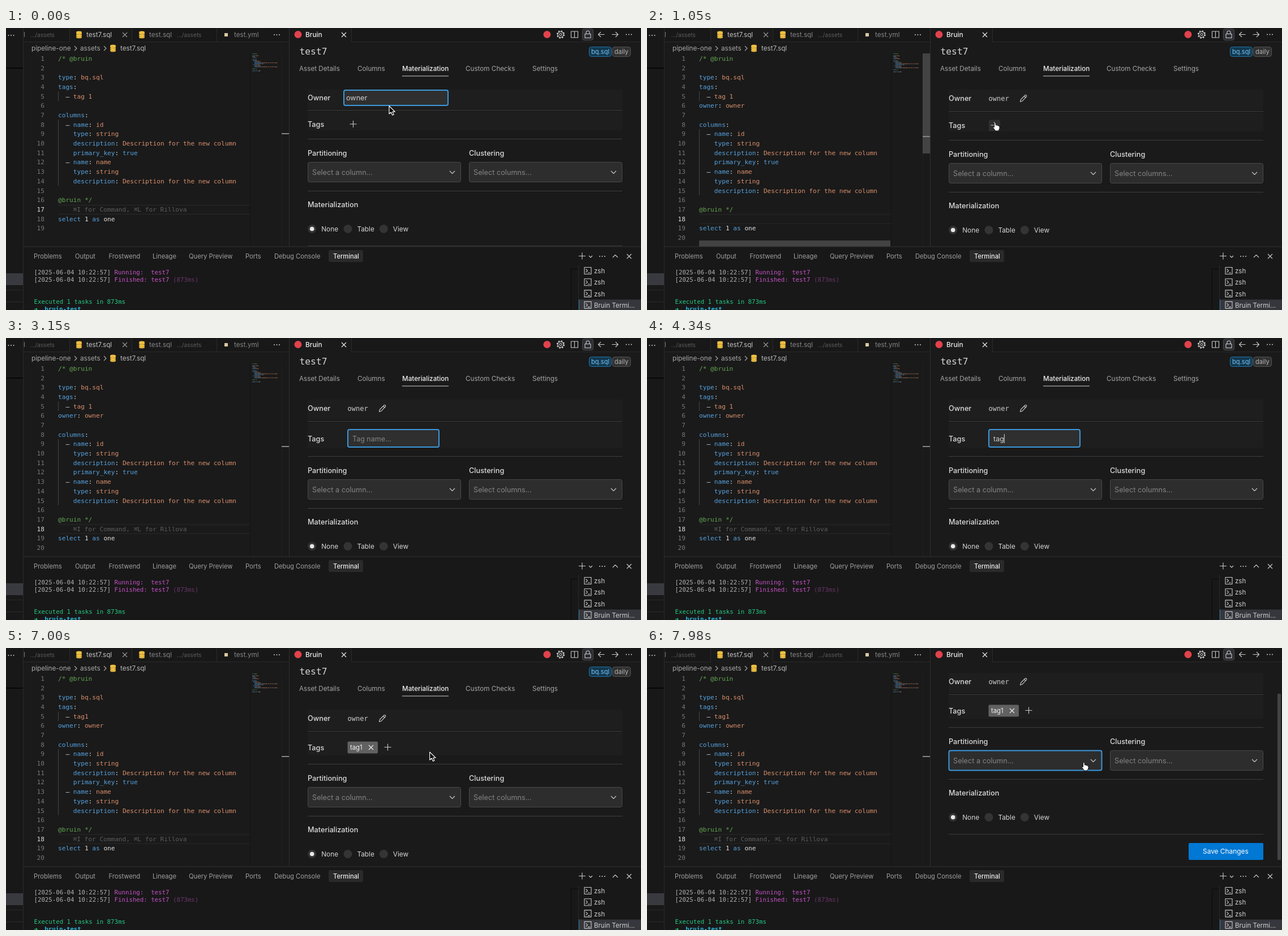
Write an HTML page with a canvas that moves like this. It is 1122 px wide and 499 px high and loops after 8000 ms.

```html
<!DOCTYPE html>
<html>
<head>
<meta charset="utf-8">
<style>
  html, body { margin: 0; width: 100%; height: 100%; overflow: hidden; background: #181818; }
  canvas { display: block; }
</style>
</head>
<body>
<canvas id="stage" width="1122" height="499"></canvas>
<script>
const ctx = document.getElementById('stage').getContext('2d');
const SANS = 'Inter, "Open Sans", sans-serif';
const MONO = '"DejaVu Sans Mono", "DejaVu Sans", monospace';
const EDITOR = '#1a1a1a', BAR = '#181818', BORDER = '#2a2a2a', RULE = '#3e3e3e';
const KEY = '#56a3e0', STRING = '#d98f6c', COMMENT = '#62a552', WHITE = '#e2e2e2';
const LIGHT = '#cacaca', DIM = '#848484', FOCUS = '#3b98dc', YELLOW = '#f0c040', RED = '#e2424c';
const LOOP = 8000, STEP = 70, LINE = 16.68, CHAR = 6.7;

// --- drawing helpers; text is placed by the vertical centre of its capitals
function text(s, x, y, color = LIGHT, size = 11.7, weight = 400, font = SANS) {
  ctx.font = `${weight} ${size}px ${font}`;
  ctx.fillStyle = color;
  ctx.fillText(s, x, y + size * 0.36);
}
const mono = (s, x, y, color, size = 11.13, weight = 400) => text(s, x, y, color, size, weight, MONO);

function rect(x, y, w, h, color) {
  ctx.fillStyle = color;
  ctx.fillRect(x, y, w, h);
}
function box(x, y, w, h, fill, stroke, radius = 3, line = 1) {
  ctx.beginPath();
  ctx.roundRect(x, y, w, h, radius);
  ctx.fillStyle = fill;
  ctx.fill();
  if (!stroke) return;
  ctx.strokeStyle = stroke;
  ctx.lineWidth = line;
  ctx.stroke();
}
function disc(x, y, r, color) {
  ctx.beginPath();
  ctx.arc(x, y, r, 0, 7);
  ctx.fillStyle = color;
  ctx.fill();
}
function icon(d, x, y, stroke = LIGHT, line = 1.1, fill) {
  const path = new Path2D(d);
  ctx.save();
  ctx.translate(x, y);
  ctx.lineWidth = line;
  ctx.lineJoin = 'round';
  ctx.strokeStyle = stroke;
  if (fill) { ctx.fillStyle = fill; ctx.fill(path); }
  ctx.stroke(path);
  ctx.restore();
}
const CROSS = 'M-4-4L4 4M4-4L-4 4', PLUS = 'M-6 0H6M0-6V6', DOWN = 'M-4.5-2L0 2.5L4.5-2', CRUMB = 'M-2-4L2 0L-2 4';
const PENCIL = 'M-5.5 6L-4.5 2L3-5.5Q4.5-6.5 5.5-5.3Q6.3-4.2 5.3-3L-2 4.8ZM1.5-4L4-1.5';
const ARROW = 'M0 0V14L3.3 11L5.8 16.2L8.2 15.2L5.9 10.2H10.3Z';
const HAND = 'M2.5 1.5Q4-.6 5.2 1.5V5Q7 4.2 7.8 5.5Q9.4 4.9 10 6.2Q12 6 12 8V10.5Q11 13 10 15H4.5Q3 12 .5 9.5Q0 7.4 2.5 8.5Z';
const dots = (x, y) => [-4.5, 0, 4.5].forEach(dx => disc(x + dx, y, 1, LIGHT));

function database(x, y) {
  ctx.fillStyle = YELLOW;
  for (const dy of [4.2, 1, -2.2, -4.6]) {
    ctx.beginPath();
    ctx.ellipse(x, y + dy, 5, 2, 0, 0, dy < -4 ? 7 : Math.PI);
    ctx.fill();
    if (dy > -4) ctx.fillRect(x - 5, y + dy - 1.3, 10, 1.4);
  }
}

// --- timing helpers
function smooth(t, from, to) {
  const p = Math.min(1, Math.max(0, (t - from) / (to - from)));
  return p * p * (3 - 2 * p);
}
function along(keys, t) {
  let [, x, y] = keys[0];
  for (let i = 1; i < keys.length; i++) {
    const p = smooth(t, keys[i - 1][0], keys[i][0]);
    x += (keys[i][1] - keys[i - 1][1]) * p;
    y += (keys[i][2] - keys[i - 1][2]) * p;
  }
  return [x, y];
}

// --- editor
function codeLines(t) {
  const column = (name, extra = []) => [`  – name: ${name}`, '    type: string',
    '    description: Description for the new column', ...extra];
  return ['/* @bruin', '', 'type: bq.sql', 'tags:', t < 6510 ? '  – tag 1' : '  – tag1',
    ...(t < 490 ? [] : ['owner: owner']), '', 'columns:',
    ...column('id', ['    primary_key: true']), ...column('name'),
    '', '@bruin */', '', 'select 1 as one', ''];
}
function tokens(line) {
  if (line.includes('@bruin')) return [[line, COMMENT]];
  if (line.startsWith('select'))
    return line.split(/(?= )/).map(w => [w, /select|as/.test(w) ? KEY : WHITE]);
  const [, lead, key = '', colon = '', value] = line.match(/^(\s*(?:– )?)(?:(\w+)(:))?(.*)$/);
  return [[lead, WHITE], [key, KEY], [colon, WHITE], [value, value === ' true' ? KEY : STRING]];
}
function scrollbarOpacity(t) {
  if (t < 490 || t >= 2400) return 0;
  return Math.max(0, 1 - 0.68 * smooth(t, 980, 1400) - 0.32 * smooth(t, 2100, 2400));
}
function drawEditor(t) {
  const lines = codeLines(t), current = lines.length - 2;
  rect(31, 25, 469, 362, EDITOR);
  text('pipeline-one', 45, 36, '#a8a8a8');
  icon(CRUMB, 123, 36, '#a8a8a8');
  text('assets', 131, 36, '#a8a8a8');
  icon(CRUMB, 175, 36, '#a8a8a8');
  database(189, 36);
  text('test7.sql', 202, 36, '#b8b8b8');

  const lineY = 54 + (current - 1) * LINE;
  rect(92, lineY - 8, 339, 1, BORDER);
  rect(92, lineY + 8, 339, 1, BORDER);
  const columnsAt = lines.indexOf('columns:');
  rect(92, 54 + 3.5 * LINE, 1, LINE, '#454545');
  rect(92, 54 + (columnsAt + 0.5) * LINE, 1, 7 * LINE, '#454545');

  lines.forEach((line, i) => {
    const y = 54 + i * LINE, n = String(i + 1);
    mono(n, 68 - n.length * CHAR, y, i === current - 1 ? WHITE : '#777');
    let col = 0;
    for (const [part, color] of tokens(line)) {
      mono(part, 92 + col * CHAR, y, color);
      ctx.globalAlpha = 0.55;
      for (const word of part.matchAll(/\S+/g))
        rect(435 + (col + word.index) * 0.95, 45 + i * 1.78, word[0].length * 0.95, 1.1, color);
      ctx.globalAlpha = 1;
      col += part.length;
    }
  });
  if (t < 490 || t >= 2660) mono('⌘I for Command, ⌘L for Rillova', 118.5, lineY, '#5c5c5c');

  rect(431, 45, 1, 342, '#141414');
  rect(487, 45, 1, 342, '#222');
  ctx.globalAlpha = scrollbarOpacity(t);
  rect(487, 45, 13, 177, '#464646');
  rect(92, 376, 338, 11, '#464646');
  ctx.globalAlpha = 1;
  rect(487, t < 490 ? 186 : 191, 13, 2, '#858585');
}

// --- form
function tagInput(t) {
  if (t < 3220) return '';
  return t < 3360 ? 'ta' : t < 5390 ? 'tag' : 'tag1';
}
const caretOn = t => t < 2660 || (t >= 3220 && t < 3850) || (t >= 4340 && t < 4830) || (t >= 5390 && t < 5880);
const label = (s, x, y) => text(s, x, y, '#dcdcdc', 12.7, 500);
const rule = y => rect(533, y - 0.5, 556, 1, RULE);

function select(s, x, y, focused) {
  box(x + 0.5, y + 0.5, 270, 35, '#2d2d2d', focused ? FOCUS : '#494949', 3, focused ? 2 : 1);
  text(s, x + 8, y + 18, DIM, 12.7);
  icon(DOWN, x + 255.5, y + 18);
}
function drawForm(t) {
  const scroll = t < 7280 ? 0 : 65 * (1 - Math.exp((7210 - t) / 90));
  const editing = t < 210;
  const mode = t < 2170 ? 'plain' : t < 6300 ? 'input' : 'chip';
  const rule1 = editing ? 145 : 147;
  const [tagGap, ruleGap] = { plain: [25.5, 51], input: [31, 62], chip: [29, 58] }[mode];
  const tagY = rule1 + tagGap, rule2 = rule1 + ruleGap;

  ctx.save();
  ctx.beginPath();
  ctx.rect(501, 25, 621, 362);
  ctx.clip();
  rect(501, 25, 621, 362, EDITOR);
  ctx.translate(0, -scroll);

  mono('test7', 518.5, 41, '#d6d6d6', 16.3);
  box(1030.5, 33.5, 39, 17, '#12384f', '#2374a8', 4);
  text('bq.sql', 1034, 42, '#7cc3f2', 11.1);
  box(1071.5, 33.5, 32, 17, '#303030', '#555', 4);
  text('daily', 1075, 42, '#b4b4b4', 11.1);
  text('Asset Details', 518, 72, '#a6a6a6');
  text('Columns', 621, 72, '#a6a6a6');
  text('Materialization', 700, 72, '#f0f0f0', 11.7, 500);
  text('Custom Checks', 812, 72, '#a6a6a6');
  text('Settings', 930, 72, '#a6a6a6');
  rect(700, 84.5, 82, 1, '#d0d0d0');

  rect(533, 109, 556, rule1 - 111, '#1e1e1e');
  rect(533, rule1 + 2, 556, rule2 - rule1 - 17, '#1e1e1e');
  label('Owner', 533, editing ? 123.5 : 124.5);
  if (editing) {
    box(597, 110, 184, 27, '#2f2f2f', FOCUS, 3, 2);
    text('owner', 601, 123.5, '#d0d0d0', 12.6);
  } else {
    mono('owner', 603.5, 124.5, '#cfcfcf', 12);
    icon(PENCIL, 665, 124.5);
  }
  rule(rule1 + 0.5);

  label('Tags', 533, tagY);
  if (mode === 'plain') {
    if (t >= 700) box(604, tagY - 10, 20, 20, '#303030');
    icon(PLUS, 613.5, tagY - 0.5);
  } else if (mode === 'input') {
    const typed = tagInput(t);
    box(604, tagY - 16, 161, 31, '#2f2f2f', FOCUS, 3, 2);
    text(typed || 'Tag name...', 612, tagY, typed ? '#d0d0d0' : DIM, 12.5);
    if (caretOn(t)) rect(612 + (typed && ctx.measureText(typed).width), tagY - 8, 1, 16, '#d8d8d8');
  } else {
    box(603.5, tagY - 10.5, 53.5, 21, '#616161', null, 2);
    text('tag1', 608, tagY, '#f0f0f0', 11.3);
    icon(CROSS, 645, tagY, '#eee');
    icon(PLUS, 674.5, tagY - 0.5);
  }
  rule(rule2 + 0.5);

  label('Partitioning', 533, rule2 + 25);
  label('Clustering', 818, rule2 + 25);
  select('Select a column...', 533, rule2 + 41, t >= 7840);
  select('Select columns...', 818, rule2 + 41);
  rule(rule2 + 92.5);
  label('Materialization', 533, rule2 + 116.5);
  const radioY = rule2 + 159.5;
  ['None', 'Table', 'View'].forEach((s, i) => {
    const x = 540.7 + i * 63.3;
    disc(x, radioY, 7.5, '#343434');
    if (i === 0) disc(x, radioY, 3.8, '#e8e8e8');
    text(s, x + 16.5, radioY, '#d6d6d6', 11.8);
  });
  rule(rule2 + 189.5);
  box(957, rule2 + 205, 132, 30, '#0078d4', null, 2);
  text('Save Changes', 982, rule2 + 220, '#fff', 11.9);
  ctx.restore();
  if (scroll) box(1114, 25 + scroll * 0.86, 6, 294, '#434343', null, 1);
}

// --- window frame
function drawTabs() {
  rect(0, 0, 1122, 25, BAR);
  rect(31, 24, 1091, 1, BORDER);
  rect(113, 0, 109, 25, EDITOR);
  rect(501, 0, 109, 25, EDITOR);
  for (const x of [112, 222, 372, 610]) rect(x, 0, 1, 25, BORDER);
  text('l', 31, 12, DIM);
  text('.../assets', 42.5, 12, '#5c5c5c', 10.2);
  database(129, 12);
  text('test7.sql', 142, 12, '#c2c2c2');
  icon(CROSS, 210, 12, '#999');
  database(240, 12);
  text('test.sql', 253, 12, '#858585');
  text('.../assets', 302, 12, '#5c5c5c', 10.2);
  rect(386, 9, 6, 6, '#d8c8a0');
  text('test.yml', 403, 12, '#858585');
  dots(478.5, 12);

  disc(516, 11.5, 6.5, RED);
  text('Bruin', 529, 12, '#eee', 11.9, 500);
  icon(CROSS, 597, 12, '#eee');
  disc(956, 11.5, 6.5, RED);
  ctx.setLineDash([2.6, 2.3]);
  icon('M6.2 0A6.2 6.2 0 1 1 6.2-.01', 980, 11.5, LIGHT, 2);
  ctx.setLineDash([]);
  icon('M5 0A5 5 0 1 1 5-.01M2 0A2 2 0 1 1 2-.01', 980, 11.5);
  icon('M-6-5.5H6V5.5H-6ZM0-5.5V5.5', 1004.5, 11.5);
  box(1018.5, 1.5, 19, 20, '#2c2e33', '#4a4a4a');
  icon('M-5-1H5V6H-5ZM-3-1V-3.5Q-3-6.5 0-6.5Q3-6.5 3-3.5V-1', 1028, 11.5);
  icon('M5.5 0H-5.5M-1-4.5L-5.5 0L-1 4.5', 1052, 11.5);
  icon('M-5.5 0H5.5M1-4.5L5.5 0L1 4.5', 1076, 11.5);
  dots(1100.5, 11.5);
}
function drawSidebar() {
  rect(0, 0, 30, 499, BAR);
  rect(30, 0, 1, 499, BORDER);
  rect(0, 70, 30, 2, '#070707');
  rect(0, 434, 30, 21, '#393a40');
  rect(0, 463, 30, 1, BORDER);
  rect(0, 484, 30, 1, BORDER);
  dots(9, 13);
}
function drawPanel() {
  rect(31, 387, 1091, 112, BAR);
  rect(31, 386.5, 1091, 1, '#303030');
  box(570, 393, 61, 21, '#2a2a2a');
  const tabs = { Problems: 49, Output: 122, Frostwend: 181.5, Lineage: 259, 'Query Preview': 323, Ports: 423, 'Debug Console': 474 };
  for (const name in tabs) text(name, tabs[name], 404, '#a0a0a0', 11.2);
  text('Terminal', 578, 404, '#ececec', 11.1, 500);
  icon(PLUS, 1018, 403.5);
  icon('M-3-1.5L0 1.5L3-1.5', 1033, 404.5);
  dots(1053.5, 404);
  icon('M-4.5 2L0-2.5L4.5 2', 1076.5, 404);
  icon(CROSS, 1101, 404);

  const term = (s, col, y, color, weight) => mono(s, 49.5 + col * 6.46, y, color, 10.73, weight);
  ['Running:  test7', 'Finished: test7'].forEach((s, i) => {
    const y = 432 + i * 13;
    term('[2025-06-04 10:22:57]', 0, y, '#b0b0b0');
    term(s, 22, y, '#c552c5');
  });
  term('(873ms)', 38, 445, '#6a366a');
  term('Executed 1 tasks in 873ms', 0, 484, '#25c983');
  term('➜', 0, 497, '#25c983', 700);
  term('bruin-test', 2.9, 497, '#2ab4d8', 700);

  rect(998, 426, 1, 73, '#0a0a0a');
  rect(998, 426, 13, 1, '#0a0a0a');
  rect(1011, 420, 1, 79, BORDER);
  rect(1012, 480.5, 110, 18.5, '#36373d');
  rect(1012, 480.5, 1, 18.5, '#2b79ab');
  ['zsh', 'zsh', 'zsh', 'Bruin Termi...'].forEach((s, i) => {
    const y = 430 + i * 20.2;
    icon('M-6-6H6V6H-6ZM-3.5-3L-.5 0L-3.5 3M0 3.5H4', 1028, y - 0.5);
    text(s, 1039, y, '#cfcfcf', 11.5);
  });
}

const POINTER_A = [[0, 677, 138], [70, 677, 138], [770, 611, 167], [1400, 611, 167], [1610, 620, 168], [1750, 620, 168], [1890, 614, 168]];
const POINTER_B = [[6440, 660, 176], [7140, 759, 185], [7420, 759, 185], [7770, 768, 202]];
function drawPointer(t) {
  if (t >= 2170 && t < 6440) return;
  const [x, y] = along(t < 2170 ? POINTER_A : POINTER_B, t);
  if ((t >= 700 && t < 2170) || t >= 7420) icon(HAND, x, y, '#111', 1, '#fff');
  else icon(ARROW, x, y, '#fff', 1.2, '#000');
}

function frame(now) {
  const t = Math.floor((now % LOOP) / STEP) * STEP;
  drawEditor(t);
  drawForm(t);
  drawTabs();
  drawSidebar();
  rect(500, 0, 1, 387, '#303030');
  drawPanel();
  drawPointer(t);
  requestAnimationFrame(frame);
}
requestAnimationFrame(frame);
</script>
</body>
</html>
```
